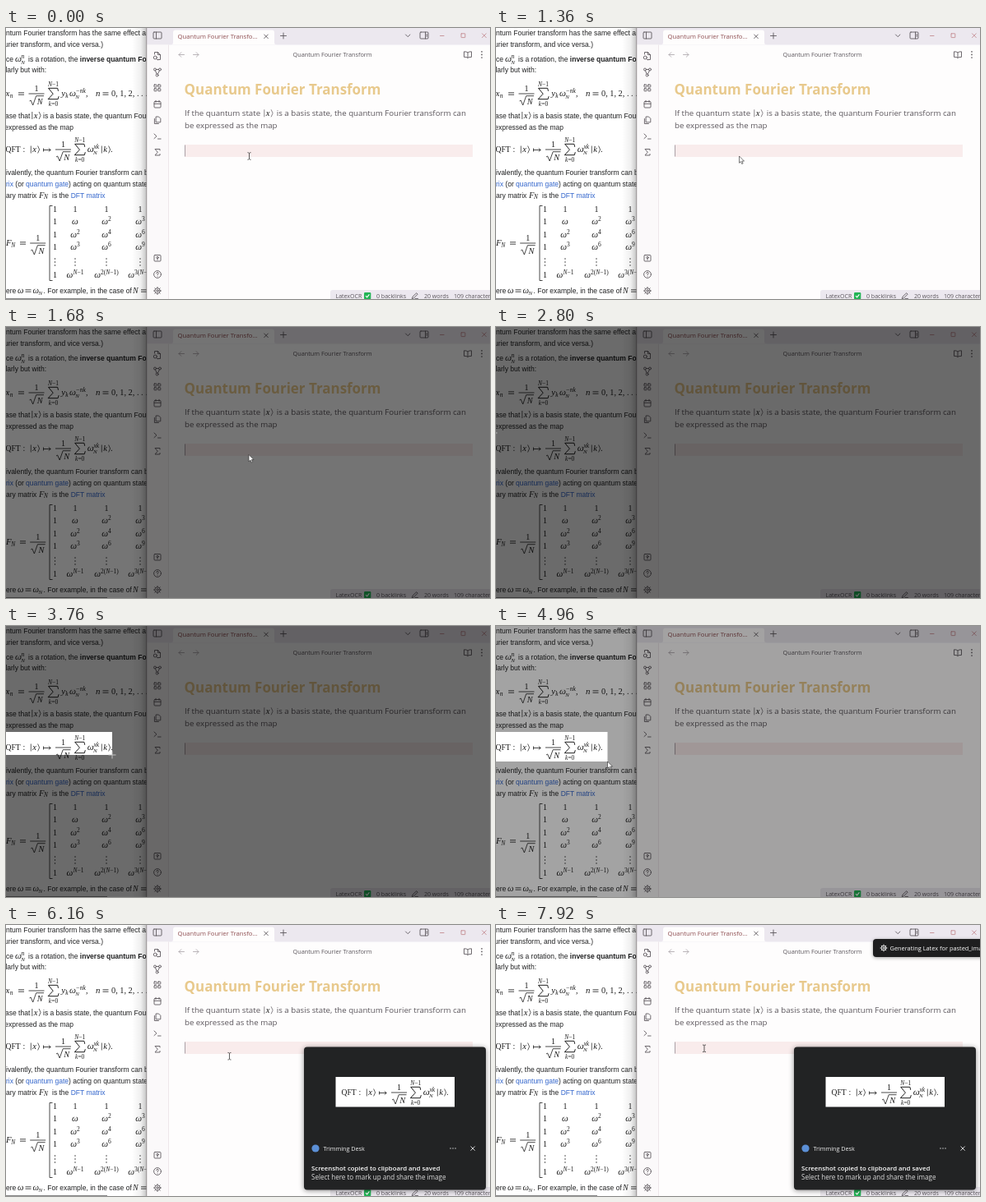
These frames come from a looping animation (588 px wide and 330 px high, 8 s). An HTML page:

```html
<!DOCTYPE html>
<html lang="en">
<head>
<meta charset="utf-8">
<title>Screen clip to formula</title>
<style>
  html, body { margin: 0; width: 100%; height: 100%; overflow: hidden; background: #fff; }
  svg { display: block; width: 588px; height: 330px; }
  text { white-space: pre; }
  .page { font: 8.5px "Liberation Sans", Arial, sans-serif; fill: #202122; }
  .page .link { fill: #3366cc; }
  .page .bold { font-weight: 700; }
  .math { font-family: "Liberation Serif", "Times New Roman", serif; fill: #1c1c1c; }
  .up { font-style: normal; }
  .ui { font-family: "Open Sans", "Noto Sans", sans-serif; }
  .ink { fill: none; stroke: #1c1c1c; stroke-width: .8; }
  .icon { fill: none; stroke: #5f5a5f; stroke-width: .9; stroke-linecap: round; stroke-linejoin: round; }
  .pale { stroke: #b2acb0; }
  .rose { stroke: #c58d92; }
  .light { stroke: #eee; }
  #snip { filter: drop-shadow(0 1px 3px rgba(0, 0, 0, .45)); }
  #notice { filter: drop-shadow(0 1px 2px rgba(0, 0, 0, .35)); }
</style>
</head>
<body>
<svg id="stage" viewBox="0 0 588 330" xmlns="http://www.w3.org/2000/svg"></svg>
<script>
const LOOP = 8000, STEP = 80;

// --- markup helpers ---
const path = (d, cls = "icon") => `<path class="${cls}" d="${d}"/>`;
const rect = (x, y, w, h, fill, r = 0) =>
  `<rect x="${x}" y="${y}" width="${w}" height="${h}" rx="${r}" fill="${fill}"/>`;
const box = (x, y, w, h, cls = "icon", r = 1) =>
  `<rect class="${cls}" x="${x}" y="${y}" width="${w}" height="${h}" rx="${r}"/>`;
const ring = (x, y, r, cls = "icon") => `<circle class="${cls}" cx="${x}" cy="${y}" r="${r}"/>`;
const page = (x, y, s, anchor = "start") =>
  `<text class="page" x="${x}" y="${y}" text-anchor="${anchor}">${s}</text>`;
const ui = (x, y, s, size, fill = "#5c575d", weight = 400) =>
  `<text class="ui" x="${x}" y="${y}" style="font-size:${size}px;font-weight:${weight};fill:${fill}">${s}</text>`;
const math = (x, y, s, size = 10, style = "italic", anchor = "start") =>
  `<text class="math" x="${x}" y="${y}" font-size="${size}" font-style="${style}" text-anchor="${anchor}">${s}</text>`;
const rm = (x, y, s, size = 10, anchor = "start") => math(x, y, s, size, "normal", anchor);
const up = s => `<tspan class="up">${s}</tspan>`;

// --- formula parts; y is the centre line ---
const equals = (x, y) => path(`M${x} ${y - 1.2}h7M${x} ${y + 1.2}h7`, "ink");
const ket = (x, y, s, color = "#1c1c1c") =>
  `<path d="M${x} ${y - 4.5}v9M${x + 8.3} ${y - 4.5}l2 4.5l-2 4.5" fill="none" stroke="${color}" stroke-width=".7"/>` +
  math(x + 2, y + 3, s, 10.5);
const overRootN = (cx, y) =>
  path(`M${cx - 9.5} ${y}h19`, "ink") + rm(cx, y - 2.8, "1", 10, "middle") +
  path(`M${cx - 8.5} ${y + 9}l1.6 -1l2.6 6l4 -11.3h9.3`, "ink") +
  math(cx + 4.3, y + 12.6, "N", 10.3, "italic", "middle");
const sum = (cx, y) =>
  `<path d="M${cx + 6} ${y - 3.2}l-.8 -3.5h-11.2l5.7 6.9l-6.1 6.5h12l1 -3.5" fill="none" stroke="#1c1c1c" stroke-width="1"/>` +
  math(cx, y - 8.8, "N" + up("−1"), 7.5, "italic", "middle") +
  math(cx, y + 15, "k" + up("=0"), 7.5, "italic", "middle");
const omegaN = (x, y, sup) =>
  math(x, y + 3, "ω", 11.3) + math(x + 7.6, y - .6, sup, 7.6) + math(x + 7.2, y + 6.2, "N", 7);
const power = (cx, y, sup) =>
  math(cx, y + 3, `ω<tspan font-size="7.5" dy="-3.6">${sup}</tspan>`, 11, "italic", "middle");
const dots = (x, y) => [-4, 0, 4].map(d => `<circle cx="${x}" cy="${y + d}" r=".7" fill="#1c1c1c"/>`).join("");

const qft =
  rm(-.5, 151.3, "QFT", 9.6) + rm(20.5, 151.3, ":", 10) + ket(30.3, 148, "x") +
  path("M45.5 148.5h8.5M45.5 146.5v4M52 146.3q.8 1.7 2.3 2.2q-1.5 .5 -2.3 2.2", "ink") +
  overRootN(69.5, 148) + sum(89.7, 148) + omegaN(98.8, 148, "xk") +
  ket(116.3, 148, "k") + rm(127, 151, ".", 10.5);

function matrix() {
  const rows = [220.5, 236, 252, 267, 285, 300.5];
  const sups = [["", "2", "3"], ["2", "4", "6"], ["3", "6", "9"]];
  const cols = [84, 122, 163];
  const minusOne = "N" + up("−1");
  const last = [minusOne, up("2(") + minusOne + up(")"), up("3(") + minusOne + up(")")];
  let s = path("M56.5 216.5h-3.5v91h3.5", "ink");
  rows.forEach((y, i) => { s += i === 4 ? dots(59.5, y) : rm(59.5, y + 3, "1", 10, "middle"); });
  cols.forEach((x, c) => {
    s += rm(x, rows[0] + 3, "1", 10, "middle");
    for (let r = 0; r < 3; r++) s += power(x, rows[r + 1], up(sups[r][c]));
    s += dots(x, rows[4]) + power(x, rows[5], last[c]);
  });
  return s;
}

function article() {
  return rect(0, 0, 172, 330, "#fff") +
    page(0, 8.5, "ntum Fourier transform has the same effect a") +
    page(118, 22.5, "urier transform, and vice versa.)", "end") +
    page(0, 40.5, "ce") + omegaN(11, 37.7, "n") +
    page(27, 40.5, "is a rotation, the <tspan class='bold'>inverse quantum Fourier</tspan>") +
    page(49, 53.5, "ilarly but with:", "end") +
    math(-.5, 83, "x", 11) + math(4.8, 85, "n", 7.5) + equals(15, 80) +
    overRootN(37, 80) + sum(57.5, 80) + math(67.3, 83, "y", 11) + math(72.3, 85, "k", 7.5) +
    omegaN(77, 80, "−nk") + rm(97, 83, ",") +
    math(109, 83, "n", 10.8) + equals(117.5, 80) + rm(128, 83, "0, 1, 2, . . .", 10.3) +
    page(-1, 109.7, "ase that") + ket(31.8, 106.5, "x") + page(45, 109.7, "is a basis state, the quantum Fourier") +
    page(82, 123.7, "expressed as the map", "end") + qft +
    page(0, 179, "ivalently, the quantum Fourier transform can be") +
    page(0, 193, "<tspan class='link'>rix</tspan> (or <tspan class='link'>quantum gate</tspan>) acting on quantum state") +
    page(0, 206.5, "ary matrix") + math(40, 206.5, "F", 10.5) + math(46, 208.2, "N", 7.3) +
    page(56, 206.5, "is the <tspan class='link'>DFT matrix</tspan>") +
    math(0, 265, "F", 10.8) + math(6.3, 266.5, "N", 7.5) + equals(17, 262) + overRootN(38.7, 262) +
    matrix() +
    page(0, 323, "ere") + math(14, 323, "ω", 10.6) + equals(23.5, 320) + math(32.5, 323, "ω", 10.6) +
    math(39.5, 324.8, "N", 7) + page(45.5, 323, ". For example, in the case of") +
    math(154, 323, "N", 10) + equals(164, 320) +
    rect(0, 329, 123, 1, "#8a8a8a");
}

const gear = (x, y, r, cls) => {
  let d = "";
  for (let i = 0; i < 8; i++) {
    const a = i * Math.PI / 4, c = Math.cos(a), s = Math.sin(a);
    d += `M${x + c * r * .75} ${y + s * r * .75}L${x + c * r} ${y + s * r}`;
  }
  return ring(x, y, r * .72, cls) + ring(x, y, r * .28, cls) + path(d, cls);
};

function sidebar() {
  return box(179, 5, 10, 8) + path("M182.5 5v8") +
    path("M180.5 32v-2.5h4l3 3v6h-3M184.5 29.5v3h3M182.8 37.6l1.4 1.4") + ring(181.3, 36, 2) +
    ring(181, 50.5, 1.5) + ring(187, 50.5, 1.5) + ring(183.6, 57.5, 1.5) + path("M181.5 52l1.6 4M186.4 52l-2 4M182.5 50.5h3") +
    [[180, 69], [184.8, 69], [180, 73.8], [184.8, 73.8]].map(p => box(...p, 3, 3, "icon", .4)).join("") +
    box(180, 89.5, 8, 7.5) + path("M180 92.3h8M182 88.3v2M186 88.3v2") +
    path("M182.5 108h3l2.3 2.3v4.5h-5.3zM180.4 110.5v6h5") +
    path("M180 129l3 2.8l-3 2.8M184.5 135h3.6") +
    path("M187 149v-1.5h-6l3.3 3.7l-3.3 3.8h6v-1.5") +
    box(180, 276.5, 8, 7.5) + ring(184, 279.5, 1.2) + path("M184 280.8v1.6") +
    ring(184, 300, 4.4) + path("M182.7 298.8q.1 -1.4 1.4 -1.4q1.3 .1 1.2 1.3q-.2 .8 -1.2 1.3v.5M184.1 302.2v.1") +
    gear(184, 320, 4.5, "icon");
}

function notes() {
  const paper = "#fefdfd", chrome = "#ece8ef";
  return rect(171, 0, 417, 330, paper) +
    rect(171, 0, 417, 20.5, chrome) + rect(171, 20.5, 26.5, 310, "#fbf9fa") +
    rect(197, 20.5, .8, 310, "#e9e3e6") +
    `<path d="M200 20.6q3 0 3 -3v-12q0 -3 3 -3h117q3 0 3 3v12q0 3 3 3z" fill="${paper}"/>` +
    ui(208.5, 12.6, "Quantum Fourier Transfo...", 7.7, "#8f4f52", 500) +
    path("M313.7 8l4.6 4.6M318.3 8l-4.6 4.6") + path("M333.5 9.5h7M337 6v7") +
    path("M485.5 8l2.7 2.7l2.7 -2.7") + box(503, 5, 10, 8) + path("M509.5 5v8M511.2 7.5v3") +
    path("M527.5 9.5h4.5M578.5 6.8l4.8 4.8M583.3 6.8l-4.8 4.8", "icon rose") + box(553, 6.8, 4.8, 4.8, "icon rose", .3) +
    path("M216.5 32.5h-6.5M212.8 29.7l-2.8 2.8l2.8 2.8M227.5 32.5h6.5M231.2 29.7l2.8 2.8l-2.8 2.8", "icon pale") +
    ui(348.5, 35.2, "Quantum Fourier Transform", 7.3) +
    path("M561 30v6.3q-1.8 -1.2 -4.5 -.9v-6.6q3 -.2 4.5 1.2q1.5 -1.4 4.5 -1.2v6.6q-2.7 -.3 -4.5 .9") +
    [28.8, 32.4, 36].map(y => `<circle cx="578" cy="${y}" r=".85" fill="#5f5a5f"/>`).join("") +
    sidebar() +
    ui(216.6, 81, "Quantum Fourier Transform", 16.95, "#e8c98c", 700) +
    ui(217, 107, "If the quantum state ", 9.69) + ket(313.8, 103.8, "x", "#5c575d") +
    ui(328.8, 107, "is a basis state, the quantum Fourier transform can", 9.69) +
    ui(217, 122, "be expressed as the map", 9.69) +
    rect(217, 142, 350, 15, "#f9ecec") + rect(217, 142.5, .9, 14, "#a0989f") +
    `<path d="M394 330v-8q0 -3 3 -3h191v11z" fill="${chrome}"/>` +
    ui(400.5, 329, "LatexOCR", 7.04) + rect(435, 322, 8.3, 8.3, "#22b455", 1.2) +
    `<path d="M437 326.2l1.6 1.7l2.8 -3.6" fill="none" stroke="#fff" stroke-width="1.1"/>` +
    ui(450, 329, "0 backlinks", 7.04) +
    path("M493.3 329.5l.8 -2.4l4.6 -4.4l1.4 1.5l-4.5 4.5zM497 329.6h3.5") +
    ui(508, 329, "20 words", 7.04) + ui(544, 329, "109 characters", 7.04);
}

function snipToast() {
  return rect(362, 148.5, 221, 174, "#222324", 4) + rect(400.5, 185, 144.5, 36.5, "#fff") +
    `<g transform="translate(408 56)">${qft}</g>` +
    `<circle cx="376" cy="272" r="4.6" fill="#5b8fd6"/>` +
    ui(385.5, 274.7, "Trimming Desk", 7.2, "#f0f0f0") +
    [540, 543, 546].map(x => `<circle cx="${x}" cy="272" r=".7" fill="#ddd"/>`).join("") +
    path("M564.8 269.8l4.6 4.6M569.4 269.8l-4.6 4.6", "icon light") +
    ui(371, 298.8, "Screenshot copied to clipboard and saved", 7.8, "#fff", 600) +
    ui(371, 310, "Select here to mark up and share the image", 8.06, "#dcdcdc");
}

const notice = () => rect(458, 17, 140, 22, "#1e1e1f", 4) + gear(471, 28, 4, "icon light") +
  ui(478.5, 30.8, "Generating Latex for pasted_image", 7.4, "#fff", 500);

// --- scene ---
document.getElementById("stage").innerHTML = `
  <defs>
    <clipPath id="left"><rect width="171" height="330"/></clipPath>
    <linearGradient id="edge">
      <stop offset="0" stop-opacity="0"/><stop offset=".6" stop-opacity=".06"/><stop offset="1" stop-opacity=".24"/>
    </linearGradient>
  </defs>
  <g clip-path="url(#left)">${article()}</g>
  <rect x="153" width="18" height="330" fill="url(#edge)"/>
  ${notes()}
  <rect x="170.4" width=".8" height="330" fill="#8d8788"/>
  <g id="snip">${snipToast()}</g>
  <g id="notice">${notice()}</g>
  <path id="dim" fill="#000" fill-rule="evenodd"/>
  <g id="cursor">
    <path id="beam" d="M-2 -4.3q1.6 0 2 .8q.4 -.8 2 -.8M0 -3.5v7M-2 4.3q1.6 0 2 -.8q.4 .8 2 .8" fill="none" stroke="#333" stroke-width=".8"/>
    <path id="arrow" d="M0 0v8.3l1.9 -1.7l1.3 2.9l1.4 -.6l-1.3 -2.8h2.7z" fill="#fff" stroke="#222" stroke-width=".6"/>
    <path id="cross" d="M-4.5 0h9M0 -4.5v9" stroke="#c9c9c9" stroke-width=".9"/>
  </g>`;

// --- motion ---
const $ = id => document.getElementById(id);
const smooth = k => k * k * (3 - 2 * k);
const easeOut = k => 1 - (1 - k) ** 3;
const clamp = k => Math.max(0, Math.min(1, k));

// keys: [time, ...values]; returns the blended values at t
function track(t, keys, ease = k => k) {
  let i = 0;
  while (i < keys.length - 2 && t >= keys[i + 1][0]) i++;
  const [a, b] = [keys[i], keys[i + 1]];
  const k = ease(clamp((t - a[0]) / (b[0] - a[0])));
  return a.slice(1).map((v, n) => v + (b[n + 1] - v) * k);
}

const shade = [[0, 0], [1360, 0], [1520, .36], [1680, .54], [1760, .58], [4800, .58], [4960, .36], [5120, 0], [LOOP, 0]];
const pointer = [
  [0, 295.5, 156], [1360, 295.5, 156], [1361, 295, 155.5], [1760, 295, 155.5], [2560, -3, 129], [2800, -3, 129],
  [3760, 129, 157], [4240, 135.5, 165], [5360, 135.5, 165], [6080, 272, 160], [6880, 253, 150.3], [LOOP, 253, 150.3]
];
const show = (id, on) => { $(id).style.display = on ? "" : "none"; };

function draw(t) {
  const [alpha] = track(t, shade);
  const [x, y] = track(t, pointer, smooth);
  const picking = t > 2800 && t < 5120;
  const hole = picking ? `M-5 129H${x}V${y}H-5z` : "";
  $("dim").setAttribute("d", "M0 0H588V330H0z" + hole);
  $("dim").setAttribute("opacity", alpha);

  $("cursor").setAttribute("transform", `translate(${x} ${y})`);
  const cross = t >= 1760 && t < 4640;
  const beam = t < 1360 || (t > 5360 && x > 217);
  show("cross", cross);
  show("beam", beam);
  show("arrow", !cross && !beam);

  const slide = (id, start, len, dist) => {
    show(id, t >= start);
    $(id).setAttribute("transform", `translate(${dist * (1 - easeOut(clamp((t - start) / len)))} 0)`);
  };
  slide("snip", 5680, 400, 230);
  slide("notice", 7440, 240, 135);
}

function frame(now) {
  draw(Math.floor((now % LOOP) / STEP) * STEP);
  requestAnimationFrame(frame);
}
draw(0);
requestAnimationFrame(frame);
</script>
</body>
</html>
```
